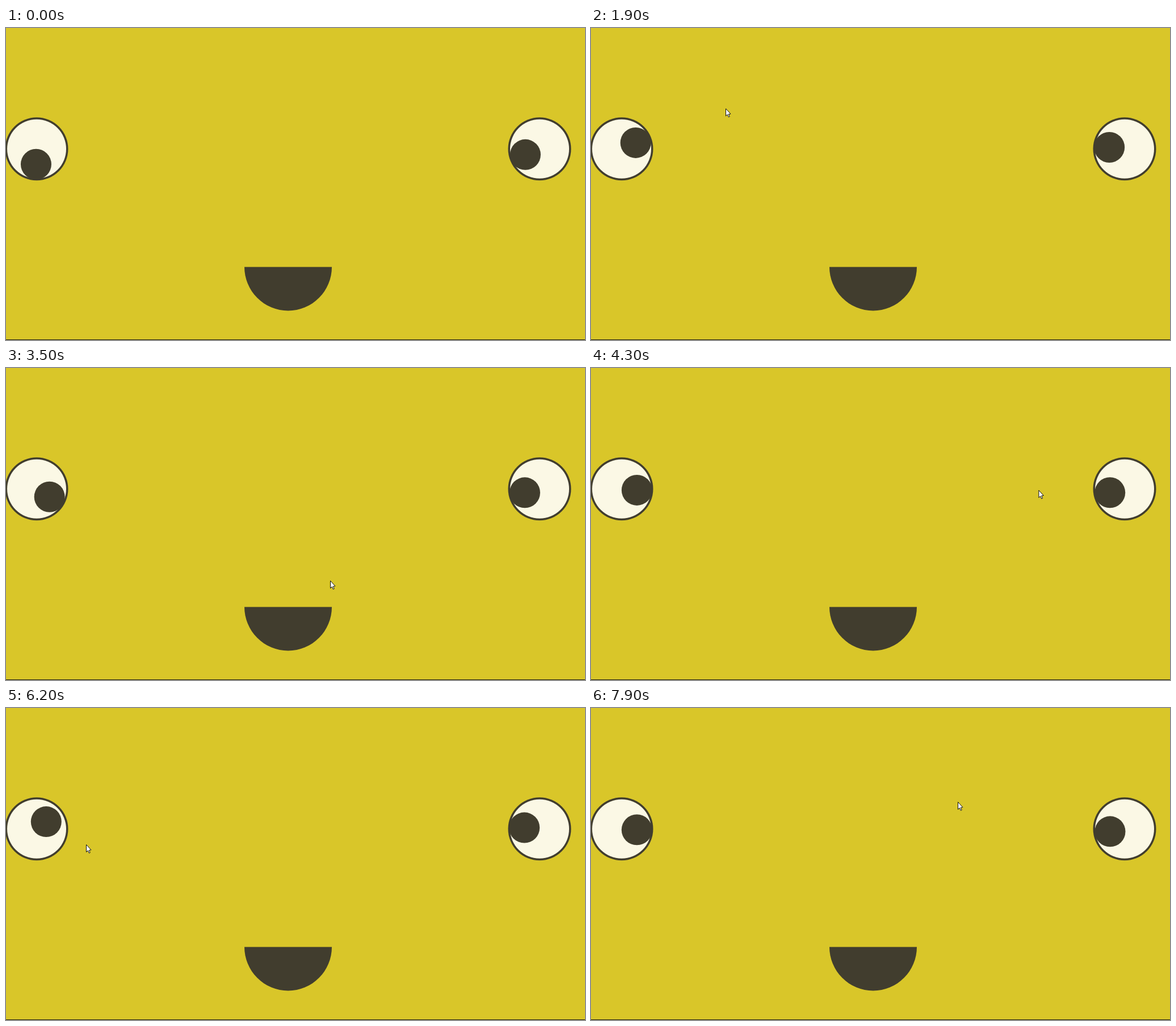
Write an HTML page with a canvas that moves like this. It is 1020 px wide and 549 px high and loops after 8000 ms.

```html
<!DOCTYPE html>
<html lang="en">
<head>
<meta charset="utf-8">
<title>Watching face</title>
<style>
  html, body { margin: 0; width: 100%; height: 100%; overflow: hidden; background: #d9c629; }
  canvas { display: block; }
</style>
</head>
<body>
<canvas id="stage" width="1020" height="549"></canvas>
<script>
const ctx = document.getElementById('stage').getContext('2d');
const W = 1020, H = 549, LOOP = 8000, STEP = 100;
const YELLOW = '#d9c629', DARK = '#413d2e', CREAM = '#fbf8e5';
const EYES = [{ x: 54, y: 212.8 }, { x: 940, y: 212.8 }];
const REACH = 27, LAG = 3;

// Turning points of the pointer: step, x, y
const TURNS = [
  [0, 40, 573], [10, 160, 252], [12, 164, 233], [18, 225, 126], [23, 285, 203],
  [26, 293, 197], [30, 150, 333], [34, 215, 335], [35, 571, 374], [39, 645, 422],
  [45, 860, 111], [50, 916, 82], [51, 829, 51], [58, 70, 30], [60, 95, 45],
  [62, 141, 240], [68, 130, 460], [75, 715, 460], [77, 725, 340], [79, 646, 165]
];

const mix = (a, b, p) => a + (b - a) * p;

function pointerAt(step) {
  const s = Math.max(0, step);
  const i = Math.max(1, TURNS.findIndex(([t]) => t >= s));
  const [t0, x0, y0] = TURNS[i - 1], [t1, x1, y1] = TURNS[i];
  const p = (s - t0) / (t1 - t0);
  return { x: mix(x0, x1, p), y: mix(y0, y1, p) };
}

// The gaze trails the pointer: mean direction over the last few steps
function pupilAt(eye, step) {
  let { x, y } = eye;
  for (let back = 0; back < LAG; back++) {
    const p = pointerAt(step - back);
    const angle = Math.atan2(p.y - eye.y, p.x - eye.x);
    x += Math.cos(angle) * REACH / LAG;
    y += Math.sin(angle) * REACH / LAG;
  }
  return { x, y };
}

function disc(x, y, r, color, end = Math.PI * 2) {
  ctx.beginPath();
  ctx.arc(x, y, r, 0, end);
  ctx.fillStyle = color;
  ctx.fill();
}

function drawPointer({ x, y }) {
  ctx.save();
  ctx.translate(x, y);
  const arrow = new Path2D('M0.5 0.5V13.5L3.3 10.8L5.3 15.3L7.2 14.5L5.3 10.2L9 9.8Z');
  ctx.fillStyle = '#fff';
  ctx.fill(arrow);
  ctx.strokeStyle = '#111';
  ctx.lineWidth = 1;
  ctx.stroke(arrow);
  ctx.restore();
}

function draw(now) {
  const step = Math.floor((now % LOOP) / STEP);
  ctx.fillStyle = YELLOW;
  ctx.fillRect(0, 0, W, H);
  for (const eye of EYES) {
    disc(eye.x, eye.y, 55.5, DARK);
    disc(eye.x, eye.y, 52, CREAM);
    const pupil = pupilAt(eye, step);
    disc(pupil.x, pupil.y, 27, DARK);
  }
  disc(497, 420.4, 77, DARK, Math.PI);
  drawPointer(pointerAt(step));
  ctx.fillStyle = '#1c1b12';
  ctx.fillRect(0, H - 1, W, 1);
}

function tick() {
  draw(performance.now());
  requestAnimationFrame(tick);
}
tick();
</script>
</body>
</html>
```
